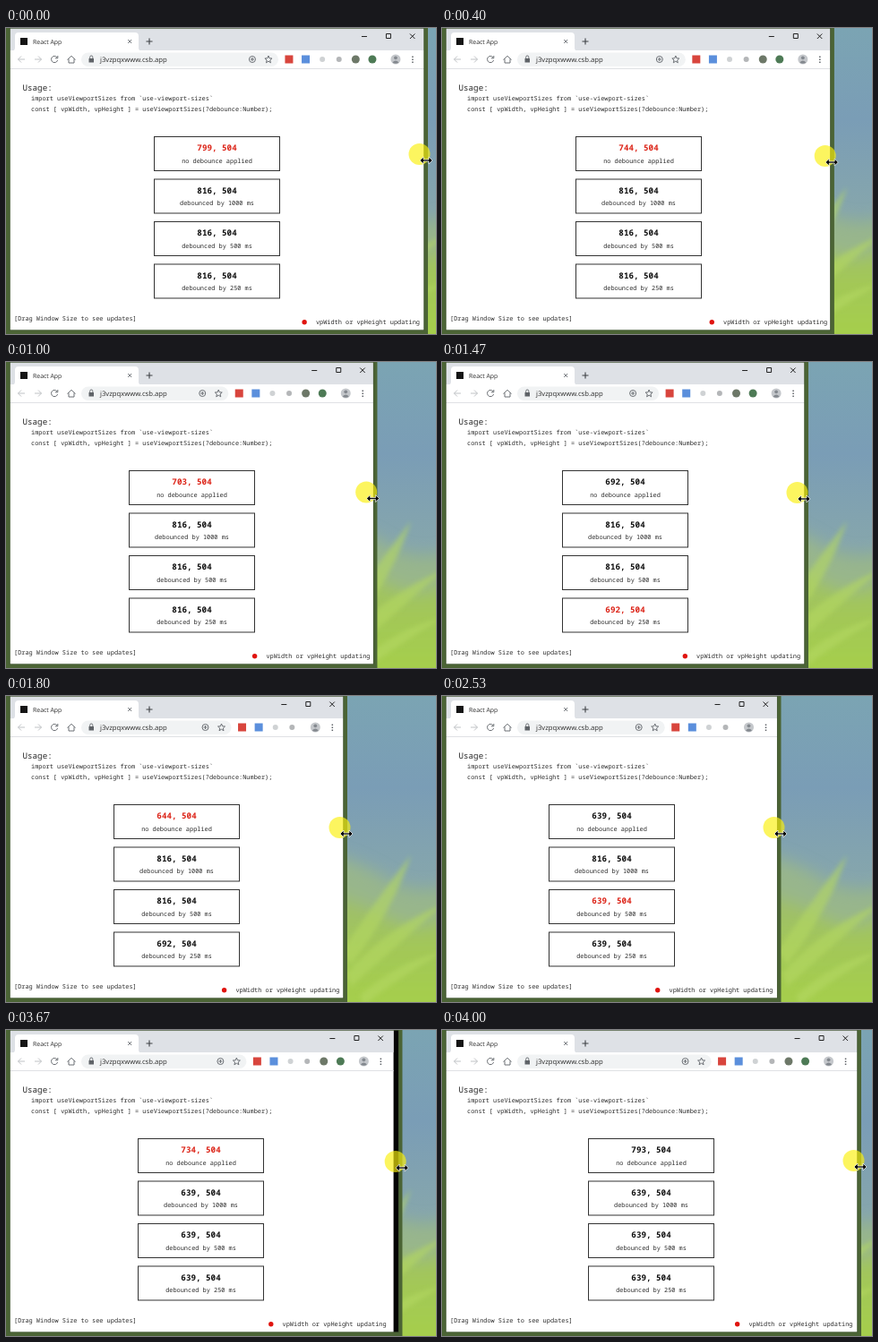
An HTML page that plays this animation: 480x342 px, repeating every 4.07 s.

```html
<!DOCTYPE html>
<html lang="en">
<head>
<meta charset="utf-8">
<title>Viewport sizes</title>
<style>
  html, body { margin: 0; width: 100%; height: 100%; overflow: hidden; }
  svg { display: block; width: 480px; height: 342px; }
  text { fill: #2a2a2a; white-space: pre; text-rendering: geometricPrecision; }
  .ui { font-family: "Open Sans", "Noto Sans", sans-serif; }
  .mono { font: 6.92px "Roboto Mono", "Noto Sans Mono", "Liberation Mono", monospace; }
  .big { font-size: 9.24px; }
  .num { font-size: 9.24px; font-weight: bold; fill: #111; }
  .num.hot { fill: #dc2418; }
  .mid { text-anchor: middle; }
  .line { fill: none; stroke: #6b6f74; stroke-width: 1; }
</style>
</head>
<body>
<svg viewBox="0 0 480 342">
  <defs>
    <linearGradient id="sky" x2="0" y2="1">
      <stop offset="0" stop-color="#7ba4b3"/>
      <stop offset=".3" stop-color="#7a9db6"/>
      <stop offset=".6" stop-color="#86a6ac"/>
      <stop offset="1" stop-color="#8fae78"/>
    </linearGradient>
    <linearGradient id="grass" x2="0" y2="1">
      <stop offset="0" stop-color="#9dbc70"/>
      <stop offset=".45" stop-color="#a3c856"/>
      <stop offset="1" stop-color="#a6d246"/>
    </linearGradient>
    <filter id="haze" x="-30%" y="-30%" width="160%" height="160%"><feGaussianBlur stdDeviation="9"/></filter>
    <filter id="soft" x="-30%" y="-30%" width="160%" height="160%"><feGaussianBlur stdDeviation="2.5"/></filter>
  </defs>

  <!-- desktop -->
  <rect width="480" height="342" fill="url(#sky)"/>
  <g filter="url(#haze)">
    <path d="M340 172Q385 180 425 205T510 205V365H340Z" fill="#98b68c"/>
    <path d="M340 215Q390 225 430 248T510 228V375H340Z" fill="url(#grass)"/>
  </g>
  <g filter="url(#soft)" fill="#b4d862" opacity=".6">
    <path d="M375 285Q415 225 452 178Q432 240 385 300Z"/>
    <path d="M380 310Q430 255 490 232Q440 275 385 325Z"/>
    <path d="M395 335Q440 295 490 285Q445 310 400 345Z"/>
  </g>

  <!-- browser window -->
  <rect id="back" width="470" height="342" fill="#050505"/>
  <rect class="wide" x="4" width="460" height="342" fill="#fff"/>
  <rect class="wide" x="4" width="460" height="25" fill="#dee1e6"/>
  <rect class="wide" x="4" y="45" width="460" height="1" fill="#dfe1e4"/>
  <path d="M7 26Q10 25 10 22V9Q10 5 14 5H144Q148 5 148 9V22Q148 25 151 26Z" fill="#fff"/>
  <rect x="16" y="11" width="8" height="8" fill="#151515"/>
  <text class="ui" x="30" y="17.6" font-size="6.9">React App</text>
  <path class="line" d="M136.200 13L140.200 17M140.200 13L136.200 17"/>
  <path d="M156.500 15H163.500M160 11.500V18.500" stroke="#3c4043" stroke-width="1.100"/>
  <g class="line">
    <path d="M21 35H13.500M17 31.500L13.500 35L17 38.500M32 35H39.500M36 31.500L39.500 35L36 38.500" stroke="#bfc2c5"/>
    <path d="M57 32.800A3.600 3.600 0 1 0 57.600 36M57.800 31V33.800H55"/>
    <path d="M68.500 35.500L73 31.300L77.500 35.500M70 34.500V39H76V34.500"/>
  </g>
  <rect id="pill" x="84" y="27.500" width="219" height="15.500" rx="7.750" fill="#f1f3f4"/>
  <rect x="92.500" y="34" width="5.500" height="4.500" fill="#5f6368"/>
  <path class="line" d="M93.700 34V32.500A1.500 1.500 0 0 1 96.800 32.500V34"/>
  <text class="ui" x="105" y="37.800" font-size="7.7">j3vzpqxwww.csb.app</text>

  <!-- parts tied to the right side of the window -->
  <g id="bar">
    <path d="M-74 9.500H-68M-46.500 6.500H-41.500V11.500H-46.500ZM-20 6.500L-14.500 12M-14.500 6.500L-20 12" fill="none" stroke="#222"/>
    <g id="marks" class="line">
      <circle cx="-41" cy="35" r="3.500"/>
      <path d="M-43 35H-39M-41 33V37"/>
      <path d="M-23 31L-21.900 33.800L-19 34L-21.200 36L-20.500 38.800L-23 37.200L-25.500 38.800L-24.800 36L-27 34L-24.100 33.800Z"/>
    </g>
    <g id="icons"></g>
    <circle cx="-36" cy="35" r="5.500" fill="#c4c7cb"/>
    <circle cx="-36" cy="33.300" r="1.900" fill="#84898f"/>
    <path d="M-39.500 38.500Q-36 34.500 -32.500 38.500Q-36 41 -39.500 38.500Z" fill="#84898f"/>
    <path d="M-17 31.500V39" stroke="#5f6368" stroke-width="1.500" stroke-dasharray="1.500"/>
  </g>

  <!-- page -->
  <g class="mono">
    <text class="big" x="18.500" y="70">Usage:</text>
    <text x="28" y="81">import useViewportSizes from `use-viewport-sizes`</text>
    <text x="28" y="92.800">const [ vpWidth, vpHeight ] = useViewportSizes(?debounce:Number);</text>
    <text x="9" y="326.500">[Drag Window Size to see updates]</text>
    <g id="boxes"></g>
    <g id="legend">
      <circle cx="-133.300" cy="328.700" r="2.700" fill="#e0140f"/>
      <text x="-4.500" y="331.300" text-anchor="end">vpWidth or vpHeight updating</text>
    </g>
  </g>

  <rect id="frame" x="2.250" y="-5" width="466" height="345" fill="none" stroke="#4b6435" stroke-width="4.500"/>
  <rect id="rim" x="4.200" y=".3" width="462" height="337.500" fill="none" stroke="#3f5230" stroke-width=".7"/>

  <g id="pointer">
    <circle cx="-7.500" cy="-7" r="12" fill="#fbf00c" opacity=".66"/>
    <path d="M-7 0L-3 -4V-1H3V-4L7 0L3 4V1H-3V4Z" fill="#000" stroke="#fff" stroke-width=".7"/>
  </g>
</svg>
<script>
const LOOP = 4070, STEP = 200 / 3;
const $ = id => document.getElementById(id);
const move = (id, x, y = 0) => $(id).setAttribute('transform', `translate(${x} ${y})`);
const width = (el, w) => el.setAttribute('width', w);

// time, window edge, viewport width, pointer x, pointer y
const drag = [
  [0, 471, 799, 469, 148],
  [580, 423, 719, 420, 151],
  [720, 422.5, 719, 418, 152],
  [1190, 409, 692, 404, 153],
  [1530, 409, 692, 404, 153],
  [1800, 381, 644, 380, 154],
  [2000, 378.5, 639, 378, 154],
  [3190, 378.5, 639, 378, 154],
  [3265, 387, 639, 387, 155],
  [3333, 396, 655, 397, 156],
  [3850, 468, 778, 467, 153],
  [3915, 468, 793, 467, 153],
  [LOOP, 468, 793, 467, 153]
];
// pauses in the drag: start, end, viewport width
const rests = [[1190, 1530, 692], [2000, 3190, 639]];

function pose(t) {
  t = Math.min(t, LOOP);
  const i = Math.max(1, drag.findIndex(k => k[0] >= t));
  const a = drag[i - 1], b = drag[i], p = (t - a[0]) / (b[0] - a[0]);
  return a.map((v, n) => v + (b[n] - v) * p);
}

function reading(t, delay) {
  if (!delay) {
    const now = Math.round(pose(t)[2]);
    return [now, now !== Math.round(pose(t + 40)[2])];
  }
  let value = 816, hot = false;
  for (const [start, end, size] of rests) {
    const fire = start + delay;
    if (fire < end && t >= fire) {
      value = size;
      hot = t - fire < 85;
    }
  }
  return [value, hot];
}

const delays = [0, 1000, 500, 250];
$('boxes').innerHTML = delays.map((d, i) => `<g transform="translate(0 ${121.5 + i * 47.5})">
  <rect x="-70" width="140" height="38" fill="#fff" stroke="#333"/>
  <text class="num mid" y="15.700"></text>
  <text class="mid" y="29">${d ? `debounced by ${d} ms` : 'no debounce applied'}</text></g>`).join('');
const nums = document.querySelectorAll('.num');

const colors = ['#d8453d', '#5b8fdc', '#cfd2d4', '#b4b6b8', '#6d7868', '#4d7a55'];
$('icons').innerHTML = colors.map((c, i) => i < 2
  ? `<rect x="-4.500" y="30.500" width="9" height="9" fill="${c}"/>`
  : `<circle cy="35" r="${i < 4 ? 3 : 4.5}" fill="${c}"/>`).join('');
const icons = [...$('icons').children];
const wide = document.querySelectorAll('.wide');

function draw(t) {
  const [, edge, view, px, py] = pose(t);
  const page = view * 0.5775, right = page + 5;
  const chrome = right + 4.5 + 0.2 * (edge - right - 4.5);
  const count = chrome > 400 ? 6 : chrome > 384 ? 5 : 4;
  const first = -62 - 18.6 * (count - 1);

  width($('back'), edge - 2);
  width($('frame'), edge - 4.5);
  width($('rim'), edge - 8.4);
  wide.forEach(el => width(el, chrome - 6.8));
  width($('pill'), chrome + first - 96);
  move('bar', chrome);
  move('marks', first);
  icons.forEach((el, i) => {
    el.setAttribute('transform', `translate(${first + 18.6 * i} 0)`);
    el.style.display = i < count ? '' : 'none';
  });

  move('boxes', Math.floor(5 + page / 2) + 0.5);
  move('legend', right);
  delays.forEach((d, i) => {
    const [value, hot] = reading(t, d);
    nums[i].textContent = `${value}, 504`;
    nums[i].classList.toggle('hot', hot);
  });
  move('pointer', px, py);
}

const begin = performance.now();
function tick() {
  const t = (performance.now() - begin) % LOOP;
  draw(Math.min(60, Math.floor((t + 5) / STEP)) * STEP);
  requestAnimationFrame(tick);
}
tick();
</script>
</body>
</html>
```
